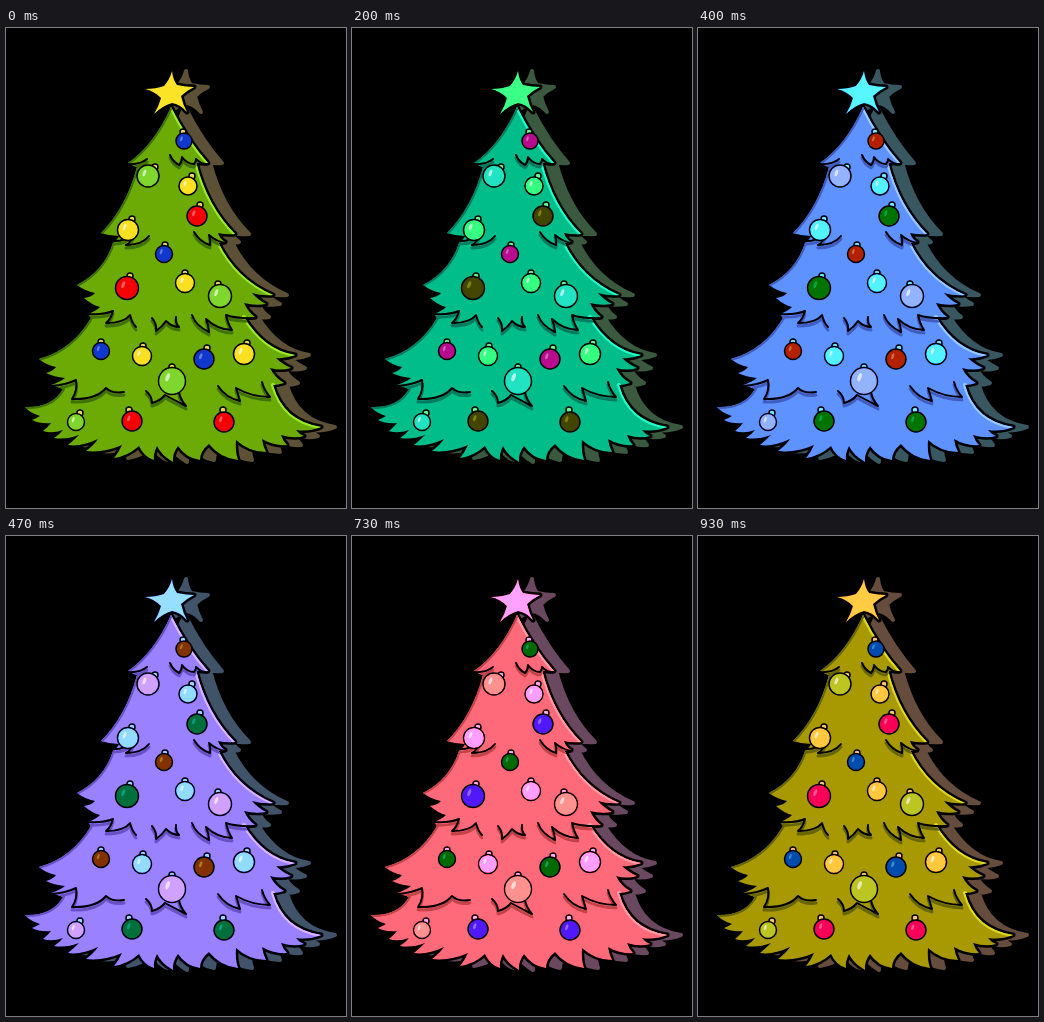
Animation of 340x480 px, one loop 990 ms. Source, as an HTML page:

```html
<!DOCTYPE html>
<html lang="en">
<head>
<meta charset="utf-8">
<title>Christmas tree</title>
<style>
html, body { margin: 0; width: 100%; height: 100%; overflow: hidden; background: #000; }
svg { display: block; width: 100vw; height: 100vh; }
</style>
</head>
<body>
<svg id="scene" viewBox="0 0 340 480" stroke-linejoin="round" stroke-linecap="round">
  <defs>
    <path id="tree" d="M165 79Q182 113 202 135Q196 136 190 134
      Q201 178 229 206Q221 207 212 205Q214 211 219 214Q215 215 212 214
      Q230 251 267 267Q256 268 246 265Q252 272 260 276Q249 278 238 275Q242 284 249 289Q243 290 238 289
      Q258 322 289 327Q280 331 270 330Q276 336 285 340Q275 343 264 340Q269 350 278 355Q272 357 267 357
      Q277 393 315 399Q303 404 290 402Q293 406 298 408Q288 411 275 407Q277 413 281 417
      Q268 418 256 411Q257 418 260 424Q243 424 230 412Q229 423 232 432Q214 430 203 416
      Q194 423 194 432Q180 430 172 418Q166 426 167 434Q155 427 151 418Q147 426 148 432
      Q138 429 133 418Q122 428 108 430Q113 424 116 417Q98 425 80 423Q88 417 92 411
      Q75 419 62 417Q68 412 73 407Q60 412 48 410Q54 406 57 402Q46 406 37 403Q42 399 45 395
      Q34 396 26 392Q31 390 34 388Q24 385 19 379Q46 380 57 361
      Q52 359 45 357Q54 354 59 350Q48 349 40 345Q47 343 50 339Q40 337 33 331Q66 322 85 290
      L82 286Q90 283 94 279Q86 277 78 270Q86 269 89 265Q79 263 71 257Q98 243 107 215
      Q112 211 113 208Q104 208 95 205Q120 180 131 139Q127 138 122 135Q148 117 165 79Z"/>
    <path id="star" d="M166 43Q167 52 171 57Q180 59 188 59Q180 63 175 68Q177 77 181 84Q174 76 166 75
      Q156 78 148 86Q153 78 155 70Q148 63 139 61Q150 61 158 58Q164 51 166 43Z"/>
    <path id="folds" d="M121 136Q134 137 141 131M164 127Q167 134 173 137Q176 134 176 129Q181 136 188 136Q190 134 190 131Q196 137 202 136
      M106 213Q118 214 127 206Q126 214 120 217Q136 217 143 208
      M188 204Q194 214 204 217Q205 212 203 207Q211 214 220 215
      M82 286Q98 287 107 283Q105 291 100 295Q118 295 124 287Q126 295 130 299
      M146 290Q151 296 150 303Q156 299 160 293Q166 299 173 299Q169 295 170 289
      M186 287Q190 298 203 304Q203 298 200 291Q212 302 226 302Q222 296 220 287Q232 291 250 290
      M45 358Q60 357 70 352Q72 362 66 371Q90 372 100 360Q106 366 118 364
      M140 363Q146 368 146 375Q154 373 159 367Q168 372 180 378Q174 371 173 364
      M212 358Q220 370 234 373Q232 366 230 360Q246 369 264 369Q258 362 256 354"/>
    <clipPath id="inside"><use href="#tree"/></clipPath>
  </defs>
  <rect width="340" height="480"/>
  <g fill="#5c5036" stroke="#5c5036" stroke-width="4" transform="translate(14 0)">
    <use href="#tree"/><use href="#star"/>
  </g>
  <use href="#tree" fill="#6cab06" stroke="#000" stroke-width="5" paint-order="stroke"/>
  <g clip-path="url(#inside)" fill="none">
    <path stroke="#98ed28" stroke-width="4" d="M165 79Q182 113 202 135M190 134Q201 178 229 206
      M212 214Q230 251 267 267M238 289Q258 322 289 327M267 357Q277 393 315 399"/>
    <path stroke="#3f7200" stroke-width="4" d="M122 135Q148 117 165 79M95 205Q120 180 131 139
      M71 257Q98 243 107 215M33 331Q66 322 85 290M19 379Q46 380 57 361"/>
    <use href="#folds" y="3" stroke="#3f7200" stroke-width="3"/>
  </g>
  <use href="#folds" fill="none" stroke="#000" stroke-width="2"/>
  <use href="#star" fill="#fbe428" stroke="#000" stroke-width="5" paint-order="stroke"/>
  <g id="balls" stroke="#000" stroke-width="1.5"></g>
</svg>
<script>
const colors = { b: '#1038cc', g: '#7fd62c', y: '#f9e022', r: '#f50004' };
// colour, centre, radius, cap centre
const balls = `b 178 113 8 177 104|g 142 148 11 149 139|y 182 158 9 186 148|r 191 188 10 194 177
y 122 202 10.5 126 191|b 158 226 8.5 159 217|r 121 260 11.5 124 248|y 179 255 9.5 179 245
g 214 268 11.5 212 256|b 95 323 8.5 95 314|y 136 328 9.5 137 318|b 198 331 10 201 320
y 238 326 10.5 241 315|g 166 353 13.5 166 339|g 70 394 8.5 74 385|r 126 393 10 123 382
r 218 394 10 217 382`.split(/[|\n]/).map(s => s.split(' '));

document.getElementById('balls').innerHTML = balls.map(([c, x, y, r, cx, cy]) => `
  <circle cx="${cx}" cy="${cy}" r="3" fill="#f4d958"/>
  <circle cx="${x}" cy="${y}" r="${r}" fill="${colors[c]}"/>
  <ellipse cx="${x - r * .4}" cy="${y - r * .15}" rx="${r * .14}" ry="${r * .32}" fill="#fff"
    opacity="${c === 'g' || c === 'y' ? .65 : .35}" stroke="none"
    transform="rotate(20 ${x} ${y})"/>`).join('');

const scene = document.getElementById('scene');
const LOOP = 990, STEPS = 15;
const starts = Array.from({ length: STEPS }, (_, i) => Math.round(i * 20 / 3) * 10);
let shown = -1;

function draw(now) {
  const t = now % LOOP;
  const step = starts.filter(s => s <= t).length - 1;
  if (step !== shown) {
    shown = step;
    scene.style.filter = `hue-rotate(${step * 360 / STEPS}deg)`;
  }
}

let begin;
function tick(now) {
  begin ??= now;
  draw(Math.max(0, now - begin));
  requestAnimationFrame(tick);
}
draw(0);
requestAnimationFrame(tick);
</script>
</body>
</html>
```
